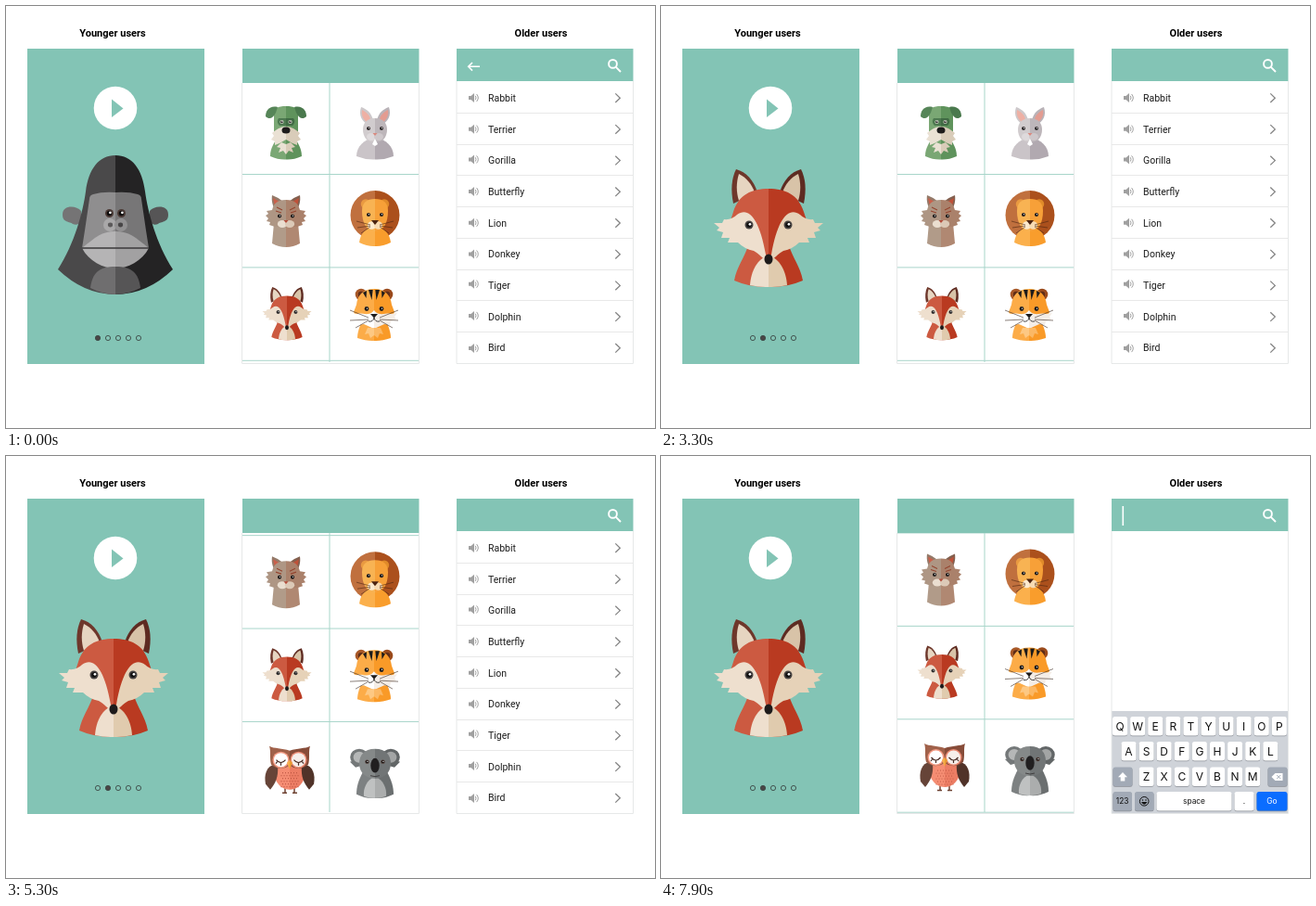
Write an HTML page with a canvas that moves like this. It is 700 by 455 pixels and loops after 8 s.

```html
<!DOCTYPE html>
<html lang="en">
<head>
<meta charset="utf-8">
<title>Animal sounds app</title>
<style>
html, body { margin: 0; width: 100%; height: 100%; overflow: hidden; background: #fff; }
canvas { display: block; width: 700px; height: 455px; }
</style>
</head>
<body>
<canvas id="stage"></canvas>
<script>
const LOOP = 8000, TEAL = '#83c4b5', INK = '#1d1b1b';
const canvas = document.getElementById('stage');
const ctx = canvas.getContext('2d');
const dpr = window.devicePixelRatio || 1;
canvas.width = 700 * dpr;
canvas.height = 455 * dpr;

const progress = (t, from, to) => Math.min(1, Math.max(0, (t - from) / (to - from)));
const ease = p => 0.5 - 0.5 * Math.cos(Math.PI * p);

function rect(x, y, w, h, color) {
  ctx.fillStyle = color;
  ctx.fillRect(x, y, w, h);
}
function shape(d, color) {
  ctx.fillStyle = color;
  ctx.fill(new Path2D(d));
}
function line(d, color, width) {
  ctx.strokeStyle = color;
  ctx.lineWidth = width;
  ctx.stroke(new Path2D(d));
}
function oval(x, y, rx, ry, color) {
  ctx.fillStyle = color;
  ctx.beginPath();
  ctx.ellipse(x, y, rx, ry, 0, 0, 7);
  ctx.fill();
}
const dot = (x, y, r, color) => oval(x, y, r, r, color);

function label(text, x, y, font, color, align = 'left') {
  ctx.font = font;
  ctx.fillStyle = color;
  ctx.textAlign = align;
  ctx.fillText(text, x, y);
}
function group(draw) {
  ctx.save();
  draw();
  ctx.restore();
}
function clipTo(x, y, w, h) {
  ctx.beginPath();
  ctx.rect(x, y, w, h);
  ctx.clip();
}
function at(x, y, scale, draw) {
  group(() => {
    ctx.translate(x, y);
    ctx.scale(scale, scale);
    draw();
  });
}
// Draws the left side, then its mirror image in the second colour.
function mirror(draw, left, right = left) {
  draw(left);
  group(() => { ctx.scale(-1, 1); draw(right); });
}
const half = (d, left, right) => mirror(c => shape(d, c), left, right);
const pair = (x, y, rx, ry, left, right) => mirror(c => oval(x, y, rx, ry, c), left, right);
const strokes = (d, color, width) => mirror(c => line(d, c, width), color);

function eyes(x, y, r, ring = '#2b2625') {
  for (const side of [-x, x]) {
    dot(side, y, r, ring);
    dot(side, y, r * 0.6, '#0d0c0c');
    dot(side + r * 0.2, y - r * 0.15, r * 0.3, '#fff');
  }
}

function gorilla() {
  half('M-37 221C-42 215-57 214-57 225C-57 234-49 232-46 235C-42 237-39 235-37 232Z', '#757475', '#565556');
  half('M0 161C-18 161-29 176-32 200C-35 222-44 256-62 284Q-34 311 0 311Z', '#4a494a', '#242324');
  half('M0 201Q-14 200-24 203Q-28 204-28 208L-33 242L-36 261H0Z', '#8f8e8f', '#777677');
  half('M0 243C-15 243-21 249-36 261C-29 275-13 283 0 283Z', '#b5b4b5', '#a2a1a2');
  pair(-6, 236, 7, 7, '#a9a8a9', '#929192');
  pair(-5.5, 236, 2.6, 2.4, '#5c5a5b', '#474546');
  line('M-36 261H36', '#3a393a', 1.6);
  eyes(6.5, 223.5, 4.5, '#4b3a36');
  half('M0 281C-18 281-25 288-27 304Q-14 311 0 311Z', '#6f6e6f', '#565556');
}

function fox() {
  half('M-35 176C-40 186-41 198-38 213L-12 201C-16 188-24 179-35 176Z', '#6e372b', '#5e2b21');
  half('M-32 181C-35 191-35 200-32 210L-15 201C-18 192-24 185-32 181Z', '#e6d5c1', '#d8c3a8');
  half('M0 258H-22C-26 272-34 280-37 296Q-20 303.5 0 303Z', '#cc5a41', '#b93a21');
  half('M0 197C-18 197-32 203-38 222L-41 231L-22 263H0Z', '#cc5a41', '#b93a21');
  half('M0 269C-12 272-19 286-20 301Q-10 303.5 0 303Z', '#eedfce', '#e0cbae');
  half('M-59 234L-50 234L-48 230Q-40 231-34 225C-22 216-10 228-3 268L0 273C-6 275-8 268-16 264Q-26 262-33 255L-44 255L-42 250L-51 250L-49 244L-56 242L-53 239Z',
    '#eedfce', '#e6d2b8');
  oval(0, 273, 4.5, 5.5, INK);
  eyes(21, 236, 4.5, '#454140');
}

function dog() {
  half('M0 140H-9C-12 148-17 152-17 162Q-8 166 0 165.5Z', '#7aa774', '#5f935c');
  half('M0 108C-9 108-13 110-13 116V144H0Z', '#7aa774', '#5f935c');
  half('M-9 109C-18 107-22 113-22 119C-18 123-14 121-11 115Z', '#568558', '#4a794d');
  half('M0 130C-6 130-10 133-15 137L-13 140L-16 144L-12 146L-12 150L-7 148L0 144Z', '#eae1d4', '#d9ccb9');
  half('M0 149L-5 147L-10 152L-6 153L-8 158L-3 156L0 160Z', '#eae1d4', '#d9ccb9');
  half('M0 121H-8Q-11 125-7 129H0Z', '#4d7950', '#406b44');
  eyes(4.5, 125, 2.1, '#cfd6c4');
  oval(0, 134, 4.5, 3.6, INK);
}

function rabbit() {
  half('M-15 109C-18 118-14 125-7 128L-2 123C-4 115-9 111-15 109Z', '#cdc8ca', '#b9b2b7');
  half('M-14 112C-15 119-12 123-8 126L-5 122C-6 117-10 114-14 112Z', '#eeb0a4', '#e39c91');
  half('M0 142C-12 143-20 152-20 162Q-10 166 0 165.5Z', '#cac4c8', '#b1a9b0');
  half('M0 121C-9 121-13 127-13 133C-13 142-8 147 0 147Z', '#d1ccce', '#bdb6ba');
  pair(-4, 141, 5, 4, '#dedadc', '#cec8cb');
  shape('M0 143L-3 149L0 151L3 149Z', '#fff');
  shape('M-2.5 137H2.5L0 140Z', '#d98a80');
  eyes(7, 132, 2.1, '#4b4345');
}

function cat() {
  half('M-15 204C-16 211-14 216-12 219L-3 211Q-9 206-15 204Z', '#947a69', '#83604f');
  half('M-14 207L-12.5 214L-7 211Z', '#c9604b', '#bf5139');
  half('M0 234H-13L-15 256Q-8 260 0 260Z', '#b19b89', '#b08872');
  half('M0 209C-10 209-13 213-15 220L-21 221L-19 224L-22 226L-19 229L-21 232L-17 233L-18 236L-12 238H0Z', '#ae9684', '#aa816b');
  pair(-4, 235, 5.2, 4, '#eaded0', '#dcc9b7');
  strokes('M-4 220L-10 217M-5 223L-11 221', '#94452f', 1.1);
  shape('M-2.5 231H2.5L0 234Z', '#b34d3c');
  eyes(7, 226.5, 2.1);
}

function lion() {
  half('M0 199A26.5 26.5 0 0 0 0 252Z', '#c0703e', '#ab501c');
  half('M0 238C-10 238-16 246-17 255Q-8 259.5 0 259Z', '#fbb04c', '#f99d2c');
  pair(-10, 213.5, 5.2, 5.2, '#e99a41', '#e08a29');
  half('M0 208C-9 208-14 212-14 221C-14 234-9 243 0 243Z', '#f8b353', '#f7a038');
  pair(-3.5, 236.5, 4.6, 4.2, '#fdebcf', '#f7dbb3');
  shape('M-4 231H4L0 236Z', '#4c2512');
  strokes('M-5 236L-20 232M-5 237L-19 239M-5 238L-15 245', '#4c2512', 0.6);
  eyes(7, 225, 2.1);
}

function tiger() {
  pair(-14, 311, 6.3, 6.3, '#a85827', '#9a4a1c');
  pair(-14, 311, 3.2, 3.2, '#5e2d18');
  half('M0 338H-12C-16 346-18 352-18 358Q-8 361.5 0 361Z', '#fcac48', '#f99a28');
  half('M0 305C-12 305-18 312-19 322L-22 330L-18 338L-8 344H0Z', '#fcac48', '#f99a28');
  half('M0 328C-6 336-14 330-18 332L-25 331L-22 335L-24 338L-18 340L-17 344L-11 343L0 348Z', '#fff', '#f4ede6');
  half('M-1.3 306L-2.5 317L-6 306Z', INK);
  half('M-8 307L-8.5 315L-12 309Z', INK);
  half('M0 347L-7 347L-10 354L-6 353L-4 358L0 355Z', '#fdc883', '#fbb865');
  strokes('M-6 336L-26 328M-6 338L-26 339M-6 339L-20 347', '#3c2b22', 0.6);
  shape('M-4 332H4L0 336.5Z', INK);
  strokes('M0 336Q-1 341-6 340', INK, 0.8);
  eyes(8, 326.5, 2.4);
}

function owl() {
  strokes('M-5 354V360M-8 360.5H-3', '#6e4232', 1.5);
  half('M0 325H-17C-21 339-14 357 0 357Z', '#f58d73', '#ec7d64');
  half('M-16 330C-25 331-28 341-26 351L-21 357C-15 350-12 342-13 332Z', '#664438', '#503329');
  for (let y = 339; y < 355; y += 3)
    for (let x = -9 + y % 2 * 1.5; x < 10; x += 3) dot(x, y, 0.55, '#b9523f');
  half('M0 315C-8 312-17 313-22 310C-20 316-22 323-20 330Q-10 338 0 331Z', '#a0614a', '#874c39');
  pair(-9.5, 325, 9, 9, '#f39a83', '#ea8a73');
  pair(-9.5, 325, 7.5, 7.5, '#fff', '#f6eeea');
  strokes('M-14.5 325Q-9.5 331-4.5 325M-13.5 327L-15 329M-9.5 328V331', '#472b24', 1.2);
  half('M0 325L-3 328L0 335Z', '#f6b04c', '#e99a34');
}

function koala() {
  pair(-17, 322, 9.8, 9, '#747879', '#626667');
  half('M-24 326L-27 327L-21 333L-14 331Z', '#747879', '#626667');
  pair(-17, 322, 6.4, 6, '#b5b7b7', '#a3a5a5');
  half('M0 338H-13C-18 347-20 354-20 362Q-10 367 0 366Z', '#7d8182', '#6b6f70');
  half('M0 343C-9 346-13 356-12 364Q-6 366.5 0 366Z', '#bfc1c1', '#abadad');
  half('M0 313C-12 313-17 320-17 329C-17 339-9 345 0 345Z', '#858989', '#717576');
  oval(0, 331, 4.7, 7.8, '#211f20');
  line('M-5 342Q0 344 5 342', '#3b393a', 0.9);
  eyes(8.5, 327, 2.2, '#4e3a34');
}

function carousel(t) {
  const p = ease(progress(t, 1130, 2070));
  group(() => {
    clipTo(23, 46, 191, 340);
    rect(23, 46, 191, 340, TEAL);
    at(118 - 200 * p, 0, 1, gorilla);
    at(316 - 200 * p, 0, 1, fox);
    dot(118, 110, 23.3, '#fff');
    shape('M114 100.5L126.5 110.5L114 120Z', TEAL);
    for (let i = 0; i < 5; i++) {
      ctx.globalAlpha = [1 - p, p][i] || 0;
      dot(99 + 11 * i, 358, 2.7, '#4a4646');
      ctx.globalAlpha = 1;
      line(`M${101.6 + 11 * i} 358a2.6 2.6 0 1 1-5.2 0a2.6 2.6 0 1 1 5.2 0`, '#3d4a47', 0.9);
    }
  });
}

function grid(t) {
  const scroll = 98.5 * ease(progress(t, 3600, 5500));
  rect(255, 46, 190.5, 37, TEAL);
  group(() => {
    clipTo(255, 83, 190.5, 302.5);
    rect(348.5, 83, 1, 301, '#a8d5ca');
    ctx.translate(0, -scroll);
    for (let i = 0; i < 4; i++) rect(255, 181 + 100.4 * i, 190.5, 1, '#a8d5ca');
    at(302, 0, 1, dog);
    at(398, 0, 1, rabbit);
    at(302, 0, 1, cat);
    at(398, 0, 1, lion);
    at(303, 223.8, 0.45, fox);
    at(397, 0, 1, tiger);
    at(306, 98.5, 1, owl);
    at(398, 98.5, 1, koala);
  });
  line('M254.5 83V385.5H445.5V83', '#e6e8e8', 1);
}

const animals = ['Rabbit', 'Terrier', 'Gorilla', 'Butterfly', 'Lion', 'Donkey', 'Tiger', 'Dolphin', 'Bird'];
const nudge = [0, 0, -1, 0, 0, 0, -1.5, -1, 0.5];

function list() {
  animals.forEach((name, i) => {
    const y = 99 + 33.7 * i;
    label(name, 520, y + 3.8, '10.5px Roboto, sans-serif', '#1c1c1c');
    line(`M657.3 ${y - 4.6}l5 4.8l-5 4.8`, '#858585', 1.3);
    at(499, y + nudge[i], 1, () => {
      shape('M0-2H2.5L6-5V5L2.5 2H0Z', '#a0a0a0');
      line('M7.3-2.2Q8.6 0 7.3 2.2M8.6-4Q12 0 8.6 4', '#a0a0a0', 1);
    });
    rect(486, Math.round(y + 16), 190.5, 1, '#e8e8e8');
  });
}

function key(x, y, w, color = '#fff') {
  ctx.fillStyle = '#8b8f96';
  ctx.beginPath();
  ctx.roundRect(x, y + 0.7, w, 20.5, 2.5);
  ctx.fill();
  ctx.fillStyle = color;
  ctx.beginPath();
  ctx.roundRect(x, y, w, 20.5, 2.5);
  ctx.fill();
}
function keyRow(letters, x, y) {
  [...letters].forEach((c, i) => {
    const cx = x + 19.1 * i;
    key(cx - 8, y, 16);
    label(c, cx, y + 14.7, '12px Inter, sans-serif', '#111', 'center');
  });
}

function keyboard() {
  const gray = '#a2aab6', small = '8.4px Inter, sans-serif';
  rect(486, 275, 190.5, 110.5, '#cfd3d9');
  keyRow('QWERTYUIOP', 495, 281);
  keyRow('ASDFGHJKL', 504.5, 308);
  keyRow('ZXCVBNM', 523.6, 335.5);
  key(487.5, 335.5, 21, gray);
  shape('M498 341L503 346.3H500.3V350.5H495.7V346.3H493Z', '#fff');
  key(654.5, 335.5, 21, gray);
  shape('M658.5 346L662.5 342H670.5V350H662.5Z', '#fff');
  line('M664.3 344L668.3 348M668.3 344L664.3 348', gray, 1);
  key(487.5, 362, 20.5, gray);
  label('123', 497.7, 375.3, small, '#111', 'center');
  key(511, 362, 20.5, gray);
  line('M526 372.3a4.8 4.8 0 1 1-9.6 0a4.8 4.8 0 1 1 9.6 0', '#111', 1);
  dot(519.5, 371, 0.8, '#111');
  dot(523, 371, 0.8, '#111');
  shape('M518 373H524.5Q521.2 378.5 518 373Z', '#111');
  key(534.5, 362, 81, '#fff');
  label('space', 575, 375.2, small, '#111', 'center');
  key(618.5, 362, 21, '#fff');
  label('.', 629, 375.2, small, '#111', 'center');
  key(642.5, 362, 33, '#0a6dff');
  label('Go', 659, 375.2, small, '#fff', 'center');
}

function search(t) {
  rect(486, 46, 190.5, 35, TEAL);
  line('M658.9 62.4a4.4 4.4 0 1 1-8.8 0a4.4 4.4 0 1 1 8.8 0M657.6 65.6L663 71', '#fff', 1.9);
  if (t < 1130) line('M511 65.3H498.8M503 61L498.7 65.3L503 69.6', '#fff', 1.6);
  group(() => {
    clipTo(486, 81, 190.5, 304.5);
    ctx.globalAlpha = 1 - progress(t, 6800, 7150);
    list();
    ctx.globalAlpha = 1;
    const rise = ease(progress(t, 6800, 7400));
    if (rise > 0) at(0, 111 * (1 - rise), 1, keyboard);
  });
  line('M486 81V385.5H676.5V81', '#e6e8e8', 1);
  if (t >= 7300) rect(497.5, 54, 1.6, 21, '#fff');
}

function frame(now) {
  const t = now % LOOP;
  ctx.setTransform(dpr, 0, 0, dpr, 0, 0);
  rect(0, 0, 700, 455, '#fff');
  const title = 'bold 11px Roboto, sans-serif';
  label('Younger users', 115, 32.5, title, '#000', 'center');
  label('Older users', 577, 32.5, title, '#000', 'center');
  carousel(t);
  grid(t);
  search(t);
  requestAnimationFrame(frame);
}
frame(performance.now());
</script>
</body>
</html>
```
